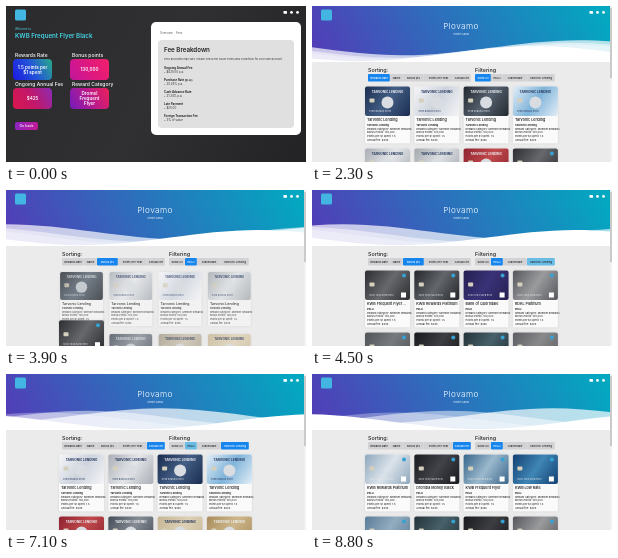
Animation, 300 px wide and 156 px high, one loop 8900 ms. Source, as an HTML page with a canvas:

```html
<!DOCTYPE html>
<html lang="en">
<head>
<meta charset="utf-8">
<title>Credit card finder</title>
<style>
html, body { margin: 0; width: 100%; height: 100%; overflow: hidden; background: #fff; }
canvas { display: block; width: 100vw; height: 100vh; }
</style>
</head>
<body>
<canvas></canvas>
<script>
const W = 300, H = 156, LOOP = 8900, LIST_START = 1400, MOVE = 350, HEADER = 56;
const canvas = document.querySelector('canvas');
const ctx = canvas.getContext('2d');
const SANS = 'Inter, Roboto, sans-serif';

// Text and shape helpers
function text(str, x, y, size, color = '#222', weight = 400, align = 'left') {
  ctx.font = `${weight} ${size}px ${SANS}`;
  ctx.fillStyle = color;
  ctx.textAlign = align;
  ctx.fillText(str, x, y);
}
function box(x, y, w, h, r, fill) {
  ctx.fillStyle = fill;
  ctx.beginPath();
  ctx.roundRect(x, y, w, h, r);
  ctx.fill();
}
function dot(x, y, r, fill) {
  ctx.fillStyle = fill;
  ctx.beginPath();
  ctx.arc(x, y, r, 0, 2 * Math.PI);
  ctx.fill();
}
function gradient(x0, y0, x1, y1, ...colors) {
  const g = ctx.createLinearGradient(x0, y0, x1, y1);
  colors.forEach((c, i) => g.addColorStop(i / (colors.length - 1), c));
  return g;
}
function topBar() {
  box(9, 3.5, 11, 11, 1.5, '#43b5e3');
  box(277.5, 5, 3.5, 2.8, 0.4, '#fff');
  dot(285.5, 6.4, 1.4, '#fff');
  dot(291.5, 6.4, 1.4, '#fff');
}

// Details page
function tile(label, x, y, lines, ...colors) {
  text(label, x, y, 5, '#fff', 500);
  box(x - 2, y + 2.5, 39, 21, 4, gradient(x, y + 22, x + 36, y + 3, ...colors));
  lines.forEach((line, i) =>
    text(line, x + 17.5, y + 14.8 + (i - (lines.length - 1) / 2) * 5, 4.6, '#fff', 600, 'center'));
}
const fees = [
  ['Ongoing Annual Fee', '$425.00 p.a.'],
  ['Purchase Rate (p.a.)', '20.24% p.a.'],
  ['Cash Advance Rate', '21.24% p.a.'],
  ['Late Payment', '$20.00'],
  ['Foreign Transaction Fee', '3% of value']
];
function drawDetails() {
  ctx.fillStyle = gradient(0, 0, W, H, '#2b2b2d', '#303033', '#232325');
  ctx.fillRect(0, 0, W, H);
  topBar();
  text('Welcome to...', 9, 24, 2.8, '#55d8e6');
  text('KWB Frequent Flyer Black', 9, 32, 6.2, '#45d5e6', 600);
  tile('Rewards Rate', 9, 50.5, ['1.5 points per', '$1 spent'], '#1c1fe0', '#2455d8', '#28a78c');
  tile('Bonus points', 66, 50.5, ['130,000'], '#c4169a', '#e0187f', '#f0206c');
  tile('Ongoing Annual Fee', 9, 79.5, ['$425'], '#d81650', '#c0186c', '#8d2bb0');
  tile('Reward Category', 66, 79.5, ['Dromel', 'Frequent', 'Flyer'], '#7c1cb8', '#b81a8c', '#e8205c');
  box(9, 116, 23, 8, 2, gradient(9, 116, 32, 124, '#8b25c4', '#c51a92'));
  text('Go back', 20.5, 121.4, 3.6, '#fff', 500, 'center');

  box(145, 16, 150, 113, 5, '#fff');
  text('Overview', 154, 28, 2.8, '#555');
  text('Fees', 170, 28, 2.8, '#555');
  box(152, 34, 136, 88, 4, '#e1e0e0');
  text('Fee Breakdown', 158, 46, 6.2, '#222', 600);
  text('Fees and rates may vary. Please check the issuer terms and conditions for your own account.', 158, 54, 2.7, '#333');
  fees.forEach(([name, value], i) => {
    const y = 62.5 + i * 12;
    text(name, 158, y, 2.9, '#222', 700);
    text('• ' + value, 158, y + 4, 2.9, '#333');
  });
}

// Cards: upper-case keys belong to one issuer, lower-case keys to the other network
const ISSUER = 'Tarvonic Lending', NETWORK = 'PELU';
const cards = {
  A: ['#1b2d50', '#435e85'], B: ['#f5f5f7', '#cdd3dd'], C: ['#23282e', '#566270'],
  D: ['#e2edf6', '#7fb4da'], E: ['#a9aeb5', '#e3e5e8'], F: ['#a4a9ae', '#dcdfe2'],
  G: ['#a98c5c', '#cdb78a'], H: ['#c5b594', '#ddd0b5'], I: ['#a39a86', '#c9c0ac'],
  K: ['#8f2230', '#c04a4c'], L: ['#454d5a', '#858b93'],
  a: ['#2c2e32', '#66686c', 'KWB Frequent Flyer Black'],
  b: ['#24262a', '#63666b', 'KWB Rewards Platinum'],
  c: ['#252052', '#3a3277', 'Bank of Quorndale'],
  d: ['#55575b', '#9a9b9d', 'RDKL Platinum'],
  e: ['#4f5358', '#777b80', 'KWB Rewards Black'],
  f: ['#17191c', '#3c3e42', 'Dromba Platinum'],
  g: ['#243238', '#47606a', 'RDKL Premier'],
  h: ['#5b5d60', '#88898b', 'KWB Platinum'],
  i: ['#8fa7bd', '#dbe3ea', 'KWB Rewards Platinum'],
  j: ['#191a1e', '#414349', 'Dromba Money Black'],
  k: ['#37658a', '#9bb9cd', 'KWB Frequent Flyer'],
  l: ['#123f72', '#3f86b5', 'KWB Low Rate'],
  m: ['#5a7c98', '#93acbf', 'KWB First']
};
const orders = {
  0: 'ABCDEFKabcdefghiGHILjklm',
  2: 'CEBFaLIHGADKbcdefghijklm',
  4: 'BEADKLHGFCIijklmgfdabceh'
};
const isIssuer = key => key < 'a';
const filters = { 0: () => true, 1: key => !isIssuer(key), 3: isIssuer };

// Each click picks a sort and a filter button
const states = [
  { at: -MOVE, sort: 0, filter: 0 },
  { at: 2820, sort: 2, filter: 0 },
  { at: 3800, sort: 2, filter: 1 },
  { at: 4700, sort: 2, filter: 3 },
  { at: 6200, sort: 4, filter: 3 },
  { at: 7300, sort: 4, filter: 1 }
];
states.forEach(s => s.order = [...orders[s.sort]].filter(filters[s.filter]));

function drawCard(key, x, y, presence) {
  if (y > H || presence <= 0) return;
  const [from, to, name = ISSUER] = cards[key];
  const scale = 0.75 + 0.25 * presence;
  ctx.save();
  ctx.globalAlpha = presence;
  ctx.translate(x + 22, y + 29);
  ctx.scale(scale, scale);
  ctx.translate(-22, -29);
  ctx.shadowColor = 'rgba(0,0,0,.12)';
  ctx.shadowBlur = 2;
  box(0, 0, 45, 57, 1.5, '#fafafa');
  ctx.shadowColor = 'transparent';
  box(0, 0, 45, 29.5, 2, gradient(0, 0, 45, 30, from, to, from));
  box(4.5, 12, 5, 4, 0.8, '#d5d0bd');
  if (isIssuer(key)) {
    const ink = 'BDEFHI'.includes(key) ? '#25365c' : '#eef1f4';
    text(ISSUER.toUpperCase(), 22.5, 6.5, 3.2, ink, 700, 'center');
    dot(22.5, 16, 6, '#d9dde1');
    text('3759 876543 21001', 4, 25, 2.4, ink);
  } else {
    dot(39, 5, 2, '#35a2d3');
    box(36, 22, 5, 5, 0, '#fff');
    text('4000 1234 5678 9010', 4, 25, 2.4, '#e5e7e9');
  }
  const title = name.length > 20 ? name.slice(0, 19) + '…' : name;
  text(title, 2, 34.8, 3.7, '#111', 500);
  text(isIssuer(key) ? ISSUER : NETWORK, 2, 39.2, 2.6, '#222', 700);
  ['Reward Category: Member Rewards', 'Bonus Points: 100,000', 'Points per $1 spent: 1.5', 'Annual fee: $425']
    .forEach((line, i) => text(line, 2, 43 + i * 3.8, 2.6, '#333', 500));
  ctx.restore();
}

function slot(index) {
  return [53 + index % 4 * 49.3, 80.5 + Math.floor(index / 4) * 62];
}
function drawCards(t, now) {
  const current = states[now], previous = states[Math.max(0, now - 1)];
  const u = Math.min(1, (t - current.at) / MOVE);
  const p = u * u * (3 - 2 * u);
  Object.keys(cards).forEach(key => {
    const from = previous.order.indexOf(key), to = current.order.indexOf(key);
    if (from < 0 && to < 0) return;
    const [x0, y0] = slot(from < 0 ? to : from), [x1, y1] = slot(to < 0 ? from : to);
    const presence = to < 0 ? 1 - p : from < 0 ? p : 1;
    drawCard(key, x0 + (x1 - x0) * p, y0 + (y1 - y0) * p, presence);
  });
}

// Button groups
const sortButtons = [['Rewards Rate', 22], ['Name', 13], ['Bonus pts', 21], ['Points Per Year', 29], ['Annual Fee', 18]];
const filterButtons = [['Show All', 16], [NETWORK, 12], ['Gravendale', 24], [ISSUER, 28]];
function buttonGroup(title, x, buttons, active, hover) {
  text(title, x, 65.8, 5.4, '#222', 500);
  buttons.forEach(([label, w], i) => {
    box(x, 68, w - 0.2, 7.5, 0.8, i === active ? '#1686ee' : i === hover ? '#68bce5' : '#d2d2d4');
    text(label, x + w / 2, 72.8, 2.7, i === active ? '#fff' : '#222', 500, 'center');
    x += w;
  });
}

// Layers of the drifting wave: drop, opacity, seconds per pass, head start
const waves = [[0, 0.7, 7, 2], [3, 0.5, 10, 3], [5, 0.3, 13, 4], [7, 1, 20, 5]];
const wavePath = new Path2D('M-160 44c30 0 58-18 88-18s58 18 88 18 58-18 88-18 58 18 88 18v44h-352z');
const driftEase = p => p - 0.15 * p * (1 - p) * (1 - 2 * p);
function drawHeader(t) {
  ctx.save();
  ctx.beginPath();
  ctx.rect(0, 0, W, HEADER);
  ctx.clip();
  ctx.fillStyle = gradient(25, 100, 275, -44, '#543ab7', '#00acc1');
  ctx.fillRect(0, 0, W, HEADER);
  ctx.translate(0, HEADER - 23.5);
  ctx.scale(2, 23.5 / 28);
  ctx.translate(48, -24);
  for (const [drop, alpha, seconds, lead] of waves) {
    const progress = ((t - LIST_START) / 1000 + lead) / seconds % 1;
    ctx.save();
    ctx.translate(-90 + 175 * driftEase(progress), drop);
    ctx.fillStyle = `rgba(255,255,255,${alpha})`;
    ctx.fill(wavePath);
    ctx.restore();
  }
  ctx.restore();
  topBar();
  ctx.letterSpacing = '0.4px';
  text('Plovamo', 149, 23, 8.2, '#fff', 300, 'center');
  ctx.letterSpacing = '0px';
  text('Credit Cards', 149, 29.3, 2.7, '#fff', 400, 'center');
}

function drawList(t) {
  const now = states.findLastIndex(s => t >= s.at);
  const { sort, filter } = states[now];
  const next = states[now + 1];
  const pointing = next && next.at - t <= 300;
  ctx.fillStyle = '#ebebeb';
  ctx.fillRect(0, 0, W, H);
  drawHeader(t);
  buttonGroup('Sorting:', 56, sortButtons, sort, pointing ? next.sort : -1);
  buttonGroup('Filtering', 163, filterButtons, filter, pointing ? next.filter : -1);
  drawCards(t, now);
  box(298, 0, 2, H, 0, '#f1f1f1');
  box(298.2, 2, 1.6, 70, 0, '#c1c1c1');
}

function frame() {
  const t = Math.floor(performance.now() % LOOP / 100) * 100;
  const ratio = devicePixelRatio || 1;
  const w = Math.round(innerWidth * ratio), h = Math.round(innerHeight * ratio);
  if (canvas.width !== w || canvas.height !== h) {
    canvas.width = w;
    canvas.height = h;
  }
  ctx.setTransform(w / W, 0, 0, h / H, 0, 0);
  if (t < LIST_START) drawDetails();
  else drawList(t);
  requestAnimationFrame(frame);
}
requestAnimationFrame(frame);
</script>
</body>
</html>
```
